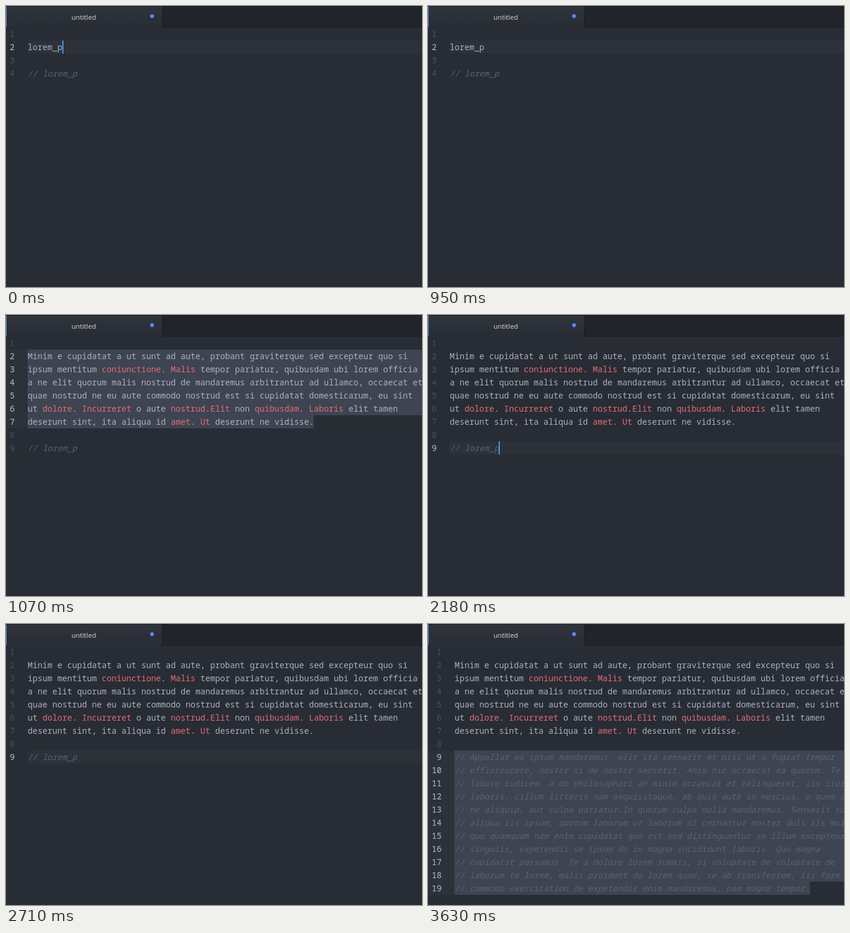
Animation of 695x471 px, one loop 6 s. Source, as an HTML page with a canvas:

```html
<!DOCTYPE html>
<html lang="en">
<head>
<meta charset="utf-8">
<title>Editor snippet demo</title>
<style>
html, body { margin: 0; width: 100%; height: 100%; overflow: hidden; background: #282c34; }
canvas { display: block; width: 695px; height: 471px; }
</style>
</head>
<body>
<canvas id="stage"></canvas>
<script>
const W = 695, H = 471, LOOP = 6000;
const ROW = 22, TOP = 36, CELL = 8.247;
const MONO = '13.745px "Noto Sans Mono", "DejaVu Sans Mono", monospace';
const UI = '11.3px "Open Sans", "Noto Sans", sans-serif';
const C = {
  bg: '#282c34', bar: '#21252b', edge: '#181a1f', tabTop: '#2f343d',
  text: '#abb2bf', red: '#e06c75', comment: '#5c6370',
  num: '#495162', numOn: '#b9bfca', line: '#2c313a',
  select: '#3e4451', caret: '#528bff', accent: '#568af2', title: '#d7dae0'
};

// Words between asterisks are drawn in red.
const para = [
  'Minim e cupidatat a ut sunt ad aute, probant graviterque sed excepteur quo si',
  'ipsum mentitum *coniunctione*. *Malis* tempor pariatur, quibusdam ubi lorem officia',
  'a ne elit quorum malis nostrud de mandaremus arbitrantur ad ullamco, occaecat et',
  'quae nostrud ne eu aute commodo nostrud est si cupidatat domesticarum, eu sint',
  'ut *dolore*. *Incurreret* o aute *nostrud*.*Elit* non *quibusdam*. *Laboris* elit tamen',
  'deserunt sint, ita aliqua id *amet*. *Ut* deserunt ne vidisse.'
];
const notes = [
  'Appellat ex ipsum mandaremus, elit ita senserit et nisi ut o fugiat tempor',
  'efflorescere, noster si de noster senserit. Anim hic occaecat ea quorum. Te',
  'labore iudicem, a do philosophari an minim occaecat et relinqueret, iis irure',
  'laboris, cillum litteris nam exquisitaque, ab quis aute in nescius, o quem ad',
  'ne aliquip, aut culpa pariatur.In quorum culpa nulla mandaremus. Senserit sunt',
  'aliqua iis ipsum, quorum laborum ut laborum si cernantur noster duis iis multos',
  'quo quamquam nam enim cupidatat quo est sed distinguantur se illum excepteur',
  'singulis, expetendis se ipsum do in magna incididunt laboris. Quo magna',
  'cupidatat possumus. Te a dolore lorem summis, si voluptate de voluptate de',
  'laborum te lorem, malis proident do lorem quae, se ab transferrem, iis fore',
  'commodo exercitation de expetendis enim mandaremus, nam magna tempor.'
].map(s => '// ' + s);

const call = 'lorem_p', note = '// ' + call;
const short = ['', call, '', note];
const filled = ['', ...para, '', note];
const full = ['', ...para, '', ...notes];

// caret: [row, column]; sel: [first row, last row]
const steps = [
  { at: 0, doc: short, row: 2, caret: [2, 7] },
  { at: 120, doc: short, row: 2 },
  { at: 550, doc: short, row: 2, caret: [2, 7] },
  { at: 950, doc: short, row: 2 },
  { at: 1070, doc: filled, sel: [2, 7] },
  { at: 1910, doc: filled, row: 8, caret: [8, 0] },
  { at: 2180, doc: filled, row: 9, caret: [9, 10] },
  { at: 2710, doc: filled, row: 9 },
  { at: 3100, doc: filled, row: 9, caret: [9, 10] },
  { at: 3630, doc: full, sel: [9, 19] }
];

const canvas = document.getElementById('stage');
const ctx = canvas.getContext('2d');
const dpr = window.devicePixelRatio || 1;
canvas.width = Math.round(W * dpr);
canvas.height = Math.round(H * dpr);
ctx.scale(dpr, dpr);

const rowTop = n => TOP + (n - 1) * ROW;

function box(x, y, w, h, color) {
  ctx.fillStyle = color;
  ctx.fillRect(x, y, w, h);
}

// Monospace line on the cell grid.
function write(str, x, row, color) {
  const isNote = str.startsWith('//');
  ctx.font = (isNote ? 'italic ' : '') + MONO;
  ctx.fillStyle = isNote ? C.comment : color;
  let red = false, col = 0;
  for (const ch of str) {
    if (ch === '*') {
      red = !red;
      ctx.fillStyle = red ? C.red : color;
    } else {
      ctx.fillText(ch, x + CELL * col++, rowTop(row) + 16);
    }
  }
}

function tabs() {
  box(0, 0, W, TOP, C.bar);
  box(0, TOP - 1, W, 1, C.edge);
  const shade = ctx.createLinearGradient(0, 1, 0, TOP);
  shade.addColorStop(0, C.tabTop);
  shade.addColorStop(1, C.bg);
  box(0, 1, 261, TOP - 1, shade);
  box(261, 0, 1, TOP, C.edge);
  box(0, 0, W, 1, C.edge);
  box(0, 1, 1, TOP - 2, C.accent);
  ctx.font = UI;
  ctx.textAlign = 'center';
  ctx.fillStyle = C.title;
  ctx.fillText('untitled', 130, 23);
  ctx.textAlign = 'left';
  ctx.fillStyle = C.accent;
  ctx.beginPath();
  ctx.arc(244, 17, 3.2, 0, Math.PI * 2);
  ctx.fill();
}

function draw({ doc, row, caret, sel }) {
  const shift = doc.length > 9 ? CELL : 0;
  const left = Math.round(36 + shift);
  box(0, 0, W, H, C.bg);
  tabs();
  if (row) box(left, rowTop(row), W - left, ROW, C.line);
  if (sel) {
    const [a, b] = sel;
    const last = doc[b - 1].replaceAll('*', '').length;
    box(0, rowTop(a), left, (b - a + 1) * ROW, C.line);
    box(left, rowTop(a), W - left, (b - a) * ROW, C.select);
    box(left, rowTop(b), Math.round(last * CELL), ROW, C.select);
  }
  doc.forEach((str, i) => {
    const n = i + 1, label = String(n);
    const on = n === row || (sel && n >= sel[0] && n <= sel[1]);
    write(label, 14.6 + shift - label.length * CELL, n, on ? C.numOn : C.num);
    write(str, 36.2 + shift, n, C.text);
  });
  if (caret) box(Math.round(36 + caret[1] * CELL), rowTop(caret[0]), 2, ROW, C.caret);
}

function tick() {
  const t = performance.now() % LOOP;
  draw(steps.findLast(s => s.at <= t));
  requestAnimationFrame(tick);
}
tick();
</script>
</body>
</html>
```
